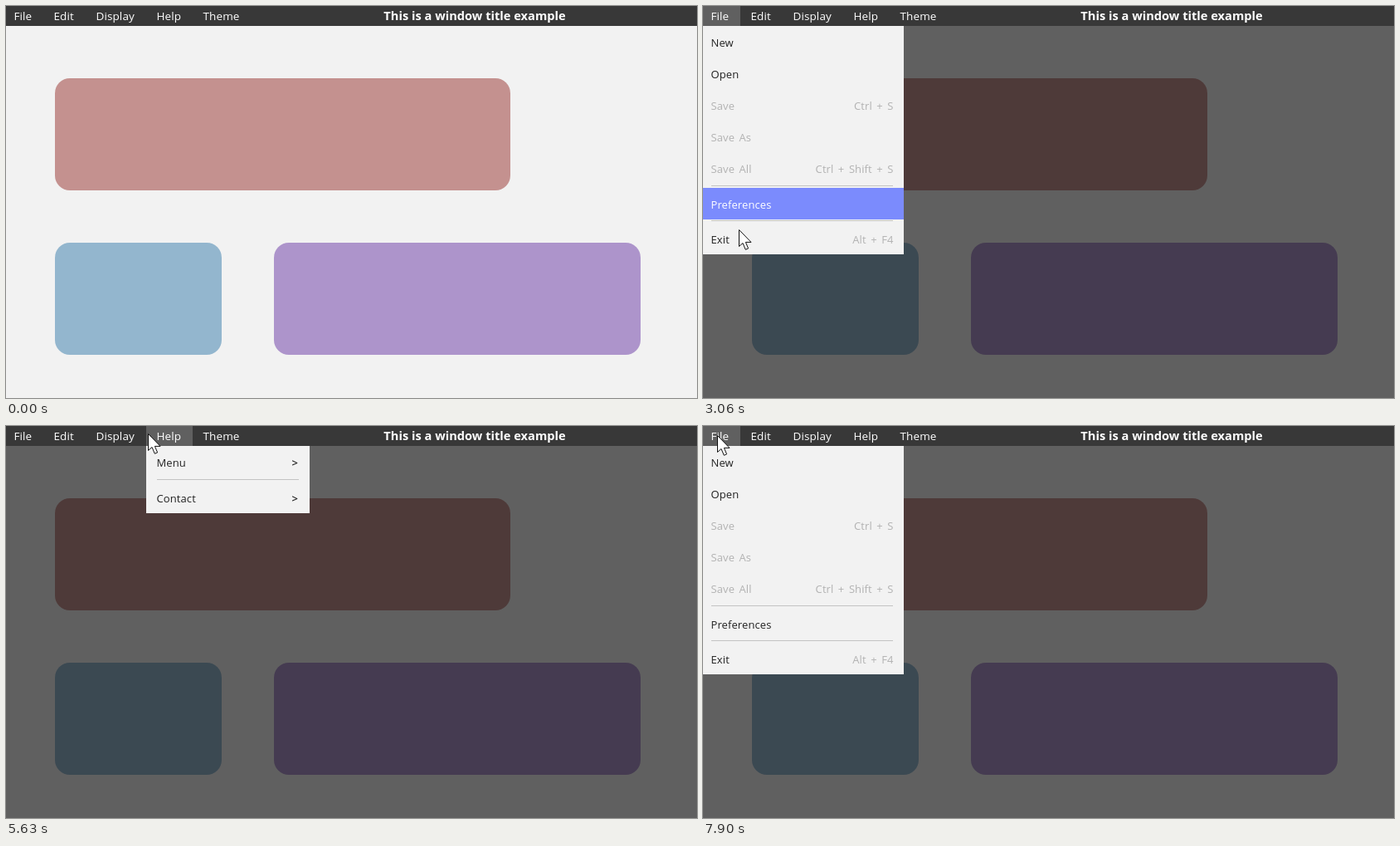
These frames come from a looping animation (833 px wide and 472 px high, 8000 ms). An HTML page with a canvas:

```html
<!DOCTYPE html>
<html lang="en">
<head>
<meta charset="utf-8">
<title>Menu bar</title>
<style>
  html, body { margin: 0; width: 100%; height: 100%; overflow: hidden; background: #f2f2f2; }
  canvas { display: block; }
</style>
</head>
<body>
<canvas id="stage" width="833" height="472"></canvas>
<script>
const ctx = document.getElementById('stage').getContext('2d');
const W = 833, H = 472, BAR = 24, ROW = 38, GAP = 4.7, PAD = 13;
const LOOP = 8000, SHOW = 510, CLICK = 1780, OPEN = 1890, TICK = 50;
const FONT = '"Open Sans", "Noto Sans", sans-serif';
const PAPER = '#f2f2f2', INK = '#222', FAINT = '#b2b2b2';

// Rows: "label|shortcut"; a leading "~" means disabled, "-" is a divider.
const menus = [
  { name: 'File', tab: 45, width: 242,
    rows: ['New', 'Open', '~Save|Ctrl + S', '~Save As', '~Save All|Ctrl + Shift + S', '-', 'Preferences', '-', 'Exit|Alt + F4'] },
  { name: 'Edit', tab: 51, width: 216,
    rows: ['~Undo|Ctrl + Z', '~Redo|Ctrl + Shift + Z', '-', '~Cut|Ctrl + X', 'Copy|Ctrl + C', 'Paste|Ctrl + V'] },
  { name: 'Display', tab: 73, width: 224, rows: ['Zoom In', 'Zoom Out'] },
  { name: 'Help', tab: 56, width: 197, rows: ['Menu|>', '-', 'Contact|>'] },
  { name: 'Theme', tab: 70, width: 163, rows: ['Light', 'Dark'] }
];

let nextX = 0;
for (const m of menus) {
  m.x = nextX;
  nextX = m.end = m.x + m.tab;
  m.left = m.x ? m.x + PAD : 10;
  m.right = m.x + m.width;
  let y = BAR;
  m.rows = m.rows.map(row => {
    const line = row === '-';
    const [label, keys] = row.replace('~', '').split('|');
    const item = { line, label, keys, off: row[0] === '~', top: Math.round(y), rule: Math.floor(y + 2) };
    y += line ? GAP : ROW;
    item.bottom = Math.round(y);
    return item;
  });
  m.bottom = Math.round(y);
}

// Pointer glides: start and end time, where to, and how late x follows y.
const home = { x: 600, y: 472 };
const glides = [
  [460, 1260, 71, 45, 2],
  [1310, 1560, 16, 12],
  [2160, 2510, 25, 64],
  [2510, 3160, 44, 283],
  [3160, 3610, 60, 62],
  [3610, 3810, 62, 15],
  [4210, 5260, 243, 12],
  [5360, 5610, 171, 9],
  [5610, 6110, 78, 12],
  [6110, 6710, 87, 184],
  [6760, 6860, 88, 190],
  [7010, 7860, 17, 11]
];

const ease = u => u * u * (3 - 2 * u);

function pointer(t) {
  if (t < SHOW) return null;
  const q = Math.floor((t - 10) / TICK) * TICK + 10;
  let { x, y } = home;
  for (const [start, end, toX, toY, bend = 1] of glides) {
    if (q <= start) break;
    const e = ease(Math.min(1, (q - start) / (end - start)));
    x += (toX - x) * e ** bend;
    y += (toY - y) * e;
  }
  return { x: Math.round(x), y: Math.round(y) };
}

function barItem(p) {
  return p && p.y < BAR ? menus.find(m => p.x >= m.x && p.x < m.end) : undefined;
}

// The open menu is the one whose tab the pointer touched last.
function openMenu(t) {
  if (t < OPEN) return null;
  for (let s = t; s >= OPEN; s -= TICK) {
    const m = barItem(pointer(s - TICK));
    if (m) return m;
  }
  return menus[0];
}

function rect(color, x, y, w, h) {
  ctx.fillStyle = color;
  ctx.fillRect(x, y, w, h);
}

function card(color, x, y, w) {
  ctx.fillStyle = color;
  ctx.beginPath();
  ctx.roundRect(x, y, w, 135, 18);
  ctx.fill();
}

function text(str, x, y, color, { font = '13px', gap = 0.1, align = 'left', words = 2 } = {}) {
  ctx.font = font + ' ' + FONT;
  ctx.letterSpacing = gap + 'px';
  ctx.wordSpacing = words + 'px';
  ctx.textAlign = align;
  ctx.fillStyle = color;
  ctx.fillText(str, x, y);
}

function drawBar(active) {
  rect('#383838', 0, 0, W, BAR);
  if (active) rect('#606060', active.x, 0, active.tab, BAR);
  for (const m of menus) text(m.name, m.left - 0.5, 17, '#fff', { font: '13.5px' });
  text('This is a window title example', 565, 17, '#fff',
    { font: 'bold 14.65px', gap: 0, align: 'center', words: 0 });
}

function drawMenu(m, p) {
  const right = m.right - PAD;
  rect(PAPER, m.x, BAR, m.width, m.bottom - BAR);
  for (const r of m.rows) {
    if (r.line) {
      rect('#c3c3c3', m.left, r.rule, right - m.left, 1);
      continue;
    }
    const hot = !r.off && p.x >= m.x && p.x < m.right && p.y >= r.top && p.y < r.bottom;
    if (hot) rect('#7b8bfd', m.x, r.top, m.width, r.bottom - r.top);
    const y = r.top + 25;
    text(r.label, m.left - 0.5, y, hot ? '#fff' : r.off ? FAINT : INK);
    if (r.keys === '>') text('>', right - 1, y, INK, { font: '600 13px', align: 'right' });
    else if (r.keys) text(r.keys, right + 0.5, y, hot ? '#a5aeea' : FAINT, { align: 'right' });
  }
}

const arrow = new Path2D('M.5 .5V20.5L5 16.5L8.3 24.3L11.6 22.9L8.4 15.4H15Z');

function drawPointer(p) {
  ctx.save();
  ctx.translate(p.x, p.y);
  ctx.fillStyle = '#fff';
  ctx.strokeStyle = '#111';
  ctx.fill(arrow);
  ctx.stroke(arrow);
  ctx.restore();
}

function drawClick() {
  ctx.fillStyle = 'rgba(212,202,30,.7)';
  ctx.beginPath();
  ctx.arc(16, 12, 12, 0, 2 * Math.PI);
  ctx.fill();
}

function draw(t) {
  const p = pointer(t), felt = pointer(t - TICK), menu = openMenu(t);
  rect(PAPER, 0, 0, W, H);
  card('#c4918f', 59, 87, 549);
  card('#93b6ce', 59, 285, 201);
  card('#ad94cb', 323, 285, 442);
  if (menu) rect('rgba(0,0,0,.6)', 0, BAR, W, H - BAR);
  drawBar(menu || barItem(felt));
  if (menu) drawMenu(menu, felt);
  if (t >= CLICK && t < OPEN) drawClick();
  if (p) drawPointer(p);
}

const begin = performance.now();
function frame() {
  draw((performance.now() - begin) % LOOP);
  requestAnimationFrame(frame);
}
frame();
</script>
</body>
</html>
```
